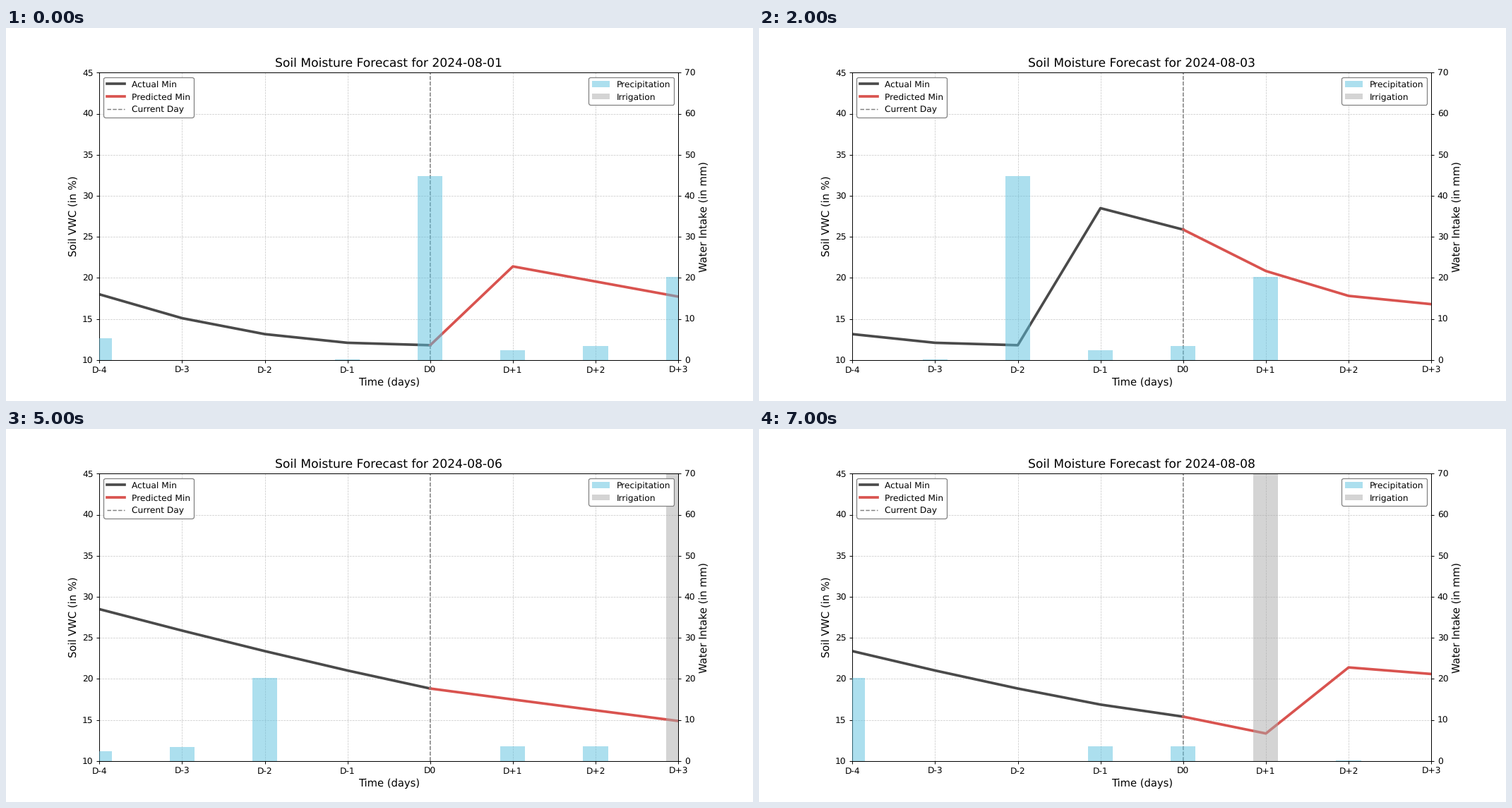
These frames come from a looping animation (1058x529 px, 8 s). A matplotlib script:

```python
import matplotlib.pyplot as plt
import numpy as np
from matplotlib.animation import FuncAnimation

DAYS = 8
PAST = 4
OFFSETS = np.arange(-PAST, DAYS - PAST)


def dry(start, end, days, power):
    """Daily levels of soil drying from start to end, fast at first."""
    t = np.arange(days + 1) / days
    return end + (start - end) * (1 - t) ** power


# Days count from the left edge of the first view, 2024-07-28.
moisture = np.concatenate([dry(18, 11.8, 4, 2.2), dry(28.5, 15.4, 6, 1.22)])
rainfall = {0: 5.3, 4: 44.9, 5: 2.4, 6: 3.35, 7: 20.2}
rainfall |= dict.fromkeys((10, 11), 3.65) | dict.fromkeys((3, 13), 0.15)
irrigation = {12: 70}
# Heavy watering days: expected peak on the next day, then daily loss.
soakings = {4: (21.4, 1.84), 12: (21.4, 0.8)}


def forecast(day):
    today = day + PAST
    now = moisture[today]
    soaked = next((d for d in soakings if today <= d < today + 3), None)
    if soaked is None:
        fade = 2.0 ** min(0, 2 - day)
        return dry(now, 14.6 + 2.2 * fade, 3, 1 + fade ** 2)
    lead = soaked - today
    peak, loss = soakings[soaked]
    before = dry(now, 13.35, lead, 3) if lead else [now]
    return np.concatenate([before, peak - loss * np.arange(3 - lead)])


plt.rcParams["text.hinting"] = "no_hinting"
fig, ax = plt.subplots(figsize=(12, 6), dpi=88.1667)
water_ax = ax.twinx()
water_ax.spines["left"].set_visible(False)

actual_line, = ax.plot([], [], color="#4a4a4a", lw=3, label="Actual Min")
predicted_line, = ax.plot([], [], color="#d9534f", lw=3, label="Predicted Min")
ax.axvline(0, color="gray", ls="--", lw=1.2, snap=False, label="Current Day")


def make_bars(color, label):
    return water_ax.bar(OFFSETS, np.zeros(DAYS), width=0.3, color=color,
                        alpha=0.5, label=label)


rain_bars = make_bars("#5bc0de", "Precipitation")
irrigation_bars = make_bars("#aaaaaa", "Irrigation")

ax.set_xlim(OFFSETS[0], OFFSETS[-1])
ax.set_ylim(10, 45)
water_ax.set_ylim(0, 70)
ax.set_xticks(OFFSETS, [f"D{n:+d}" if n else "D0" for n in OFFSETS])
ax.set_xlabel("Time (days)", fontsize=12)
ax.set_ylabel("Soil VWC (in %)", fontsize=12)
water_ax.set_ylabel("Water Intake (in mm)", fontsize=12)
ax.grid(True, ls="--", lw=0.6, alpha=0.7)
title = ax.set_title("", fontsize=14)

legend_style = dict(fontsize=10, framealpha=1, edgecolor="gray")
ax.legend(loc="upper left", **legend_style)
water_ax.legend(loc="upper right", **legend_style)


def update(day):
    title.set_text(f"Soil Moisture Forecast for 2024-08-{day + 1:02d}")
    actual_line.set_data(OFFSETS[:PAST + 1], moisture[day:day + PAST + 1])
    predicted_line.set_data(OFFSETS[PAST:], forecast(day))
    for bars, water in ((rain_bars, rainfall), (irrigation_bars, irrigation)):
        for i, bar in enumerate(bars):
            bar.set_height(water.get(day + i, 0))
    return [title, actual_line, predicted_line, *rain_bars, *irrigation_bars]


anim = FuncAnimation(fig, update, frames=DAYS, interval=1000,
                     init_func=lambda: update(0), repeat=True, repeat_delay=0)
plt.show()
```
